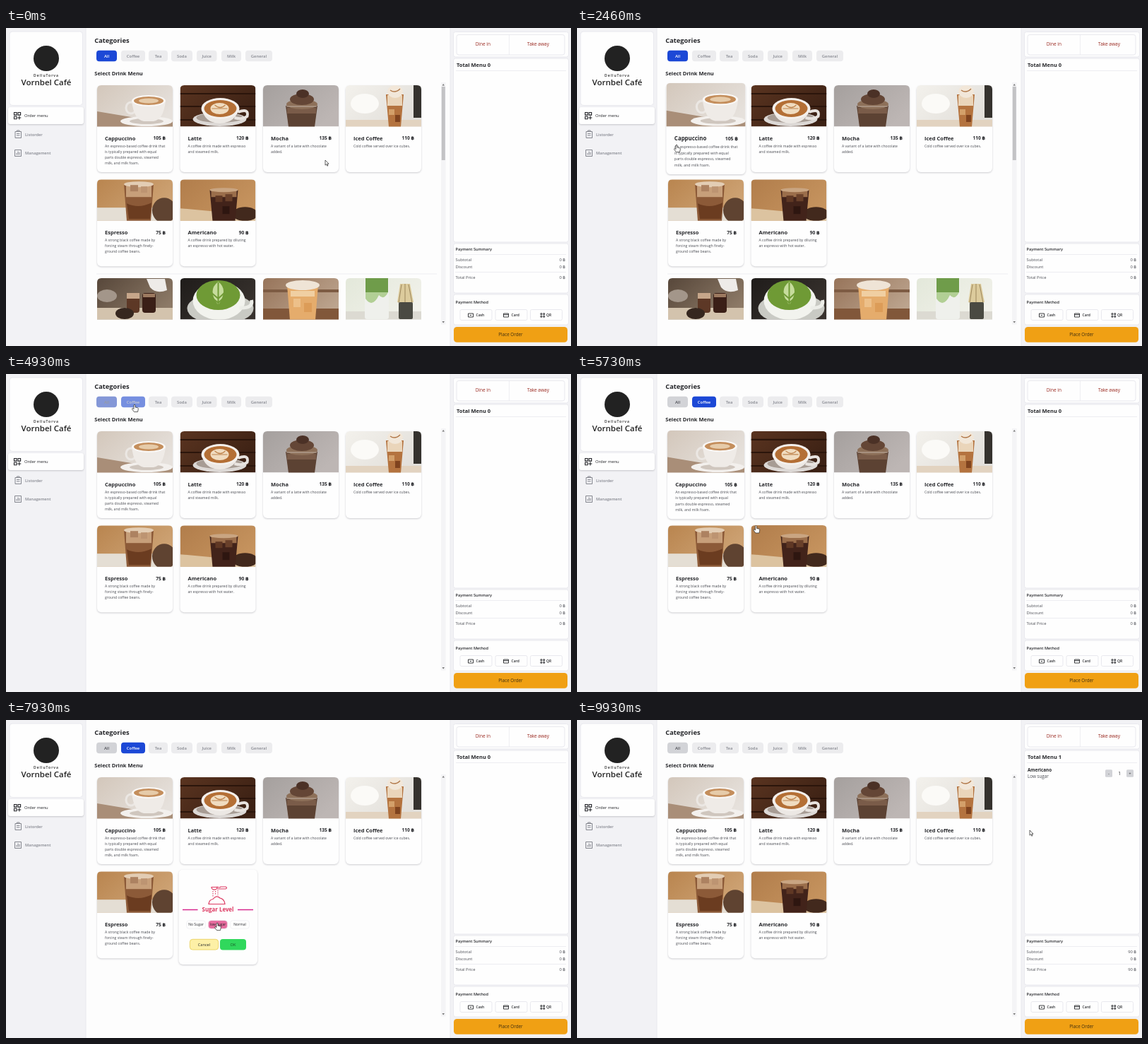
An HTML page that plays this animation: 800x450 px, repeating every 10 s.

```html
<!DOCTYPE html>
<html lang="en">
<head>
<meta charset="utf-8">
<title>Drink order screen</title>
<style>
html, body { margin: 0; height: 100%; overflow: hidden; background: #fdfdfd; }
svg { display: block; width: 800px; height: 450px; font-family: "Open Sans", "Noto Sans", "DejaVu Sans", sans-serif; }
.card > rect, .lift { filter: drop-shadow(0 1.3px 1.2px rgba(60, 60, 75, .25)); }
</style>
</head>
<body>
<svg id="stage" viewBox="0 0 800 450"></svg>
<script>
const stage = document.getElementById('stage');
const INK = '#25262a', SOFT = '#4c4e55', GREY = '#85878f', PALE = '#ececee', EDGE = '#e9e9ee';
const PAPER = '#fefefe', SIDE = '#f2f2f5', DARK = '#d2d3d7', BLUE = '#1c48d6', PINK = '#dd3a62', GREEN = '#30d85c';

// Markup helpers
const text = (x, y, s, size, fill = INK, weight = 400, anchor = 'start', extra = '') =>
  `<text x="${x}" y="${y}" font-size="${size}" fill="${fill}" font-weight="${weight}" text-anchor="${anchor}" ${extra}>${s}</text>`;
const rect = (x, y, w, h, fill, r = 0, extra = '') =>
  `<rect x="${x}" y="${y}" width="${w}" height="${h}" rx="${r}" fill="${fill}" ${extra}/>`;
const oval = (x, y, rx, ry, fill, extra = '') =>
  `<ellipse cx="${x}" cy="${y}" rx="${rx}" ry="${ry}" fill="${fill}" ${extra}/>`;
const shape = (d, fill) => `<path d="${d}" fill="${fill}"/>`;
const line = (d, color, w = .7, extra = '') => `<path d="${d}" fill="none" stroke="${color}" stroke-width="${w}" ${extra}/>`;
const box = (x, y, w, h, r = 3) => rect(x, y, w, h, PAPER, r, `stroke="${EDGE}"`);
const rule = (x1, x2, y) => line(`M${x1} ${y}H${x2}`, EDGE, .8);

let gradients = 0;
const backdrop = (from, to) => {
  const id = 'bg' + gradients++;
  return `<linearGradient id="${id}" x2="1" y2=".6"><stop stop-color="${from}"/><stop offset="1" stop-color="${to}"/></linearGradient>`
    + rect(0, 0, 107, 58.5, `url(#${id})`);
};
const glass = (l, r, y, fill) => shape(`M${l} ${y}H${r}L${r - 4} 59H${l + 4}Z`, fill);

const photos = {
  cappuccino: backdrop('#d3c7bb', '#e6e1dc') + shape('M0 37L48 45L107 51V59H0Z', '#a98e78')
    + oval(70, 51, 37, 7, '#f3f0ed') + oval(70, 51, 24, 4, '#cfc6be') + oval(48, 32, 7, 8, 'none', 'stroke="#ebe7e3" stroke-width="3"')
    + shape('M49 22H97Q94 49 80 51H66Q52 49 49 22Z', '#efebe7') + oval(73, 22, 24, 8, '#f9f7f5')
    + oval(73, 22, 21, 6, '#c48e5c') + oval(73, 22, 14, 3.5, '#e6cba9'),
  latte: backdrop('#5a3420', '#3c2114') + line('M0 12H107M0 30H107M0 49H107', '#2b150b', 2)
    + oval(56, 48, 38, 10, '#dcd8d5') + oval(56, 46, 33, 7, '#a79c94') + shape('M31 33Q34 53 56 54Q79 53 83 33Z', '#ece8e4')
    + line('M82 38Q98 32 95 44Q89 49 77 46', '#e8e3df', 4) + oval(57, 33, 27, 15, '#f4f0ec')
    + oval(57, 33, 23, 12, '#b46f35') + oval(56, 33, 13, 8, '#f0dcc0') + line('M45 33H67M49 28Q57 35 64 28', '#c08650', 1.2),
  mocha: backdrop('#a5a09e', '#bdb6b4') + glass(32, 77, 29, '#5c4233') + rect(34, 32, 41, 8, '#7a5c49')
    + oval(55, 27, 22, 7, '#8d7059') + oval(55, 20, 17, 8, '#644636') + oval(56, 12, 9, 6, '#4b3126') + line('M33 30H76', '#c0b0a4', 1),
  iced: backdrop('#f3f1ec', '#e2dfda') + rect(0, 49, 107, 10, '#e2d3c0') + oval(27, 26, 20, 14, '#fbfaf7')
    + rect(96, 0, 11, 46, '#35322e') + glass(57, 82, 13, '#b4733f') + rect(59, 14, 21, 15, '#ead5ba')
    + oval(70, 9, 11, 9, '#f2e7d9') + rect(61, 34, 8, 8, '#d3a06a') + rect(70, 42, 7, 10, '#7f431e') + line('M63 7Q70 12 77 5', '#b2794a', 1.5),
  espresso: backdrop('#b9854f', '#cfa577') + rect(0, 40, 107, 19, '#e4ded4') + oval(95, 44, 17, 18, '#5f4331')
    + glass(38, 80, 7, '#8c5a38') + rect(41, 9, 36, 16, '#c79f7a') + oval(59, 7, 21, 4, '#e3cdb4')
    + rect(47, 8, 11, 9, '#ad8261') + rect(62, 10, 9, 9, '#bd9472') + shape('M42 34Q59 42 77 33L75 56H45Z', '#6b3c20'),
  americano: backdrop('#b17d4b', '#c6945f') + shape('M0 41L45 45H107V59H0Z', '#dcc3a0') + oval(92, 49, 18, 10, '#42291d')
    + glass(42, 82, 15, '#42231a') + rect(44, 16, 36, 9, '#9b6e4b') + oval(62, 15, 20, 3, '#c9a582')
    + rect(50, 23, 10, 9, '#5f3724') + rect(64, 21, 10, 10, '#69402a') + rect(60, 38, 10, 11, '#2e1610'),
  boba: backdrop('#57473a', '#8d7a67') + rect(0, 42, 107, 17, '#d3c3ad') + oval(14, 25, 14, 9, '#a3968a')
    + rect(42, 21, 18, 28, '#5d3826', 4) + rect(64, 21, 19, 28, '#3a1f17', 4) + rect(42, 21, 18, 8, '#c6a68a')
    + rect(65, 22, 17, 5, '#9c7a60') + shape('M70 1H96L99 17Q84 23 75 13Z', '#eeebe8') + oval(39, 50, 13, 8, '#36271f'),
  matcha: backdrop('#1f1c1a', '#38322e') + oval(57, 43, 47, 22, '#c9cac4') + oval(55, 32, 37, 27, '#f2f3ee')
    + oval(54, 24, 31, 21, '#6f9a35') + shape('M54 5Q69 16 54 38Q38 17 54 5Z', '#c6dc9c')
    + line('M39 16L54 29L69 15M43 26L54 35L65 25M54 6V39', '#6f9a35', 2) + line('M84 42Q104 43 101 31', '#ecede8', 5),
  tea: backdrop('#97745a', '#bca48e') + rect(0, 43, 107, 16, '#81573a') + line('M0 18H107', '#7d5b43', 4)
    + glass(34, 78, 10, '#e5ac6c') + oval(56, 10, 24, 7, '#efe4d6') + rect(39, 18, 34, 8, '#f0cfa2')
    + rect(43, 29, 10, 12, '#edc08a') + rect(58, 35, 11, 13, '#dc9c58'),
  greenMilk: backdrop('#e3e8da', '#f1f1ea') + rect(0, 47, 107, 12, '#dcdad2') + rect(27, 0, 34, 58, '#eff0ec', 3)
    + rect(28, 0, 32, 20, '#6f9c4a') + shape('M28 20H60Q54 32 47 24Q38 43 28 29Z', '#b2cf95')
    + shape('M77 8H91L96 34H73Z', '#dccb9c') + line('M79 9L75 35M84 8V35M89 9L94 35', '#9c875c', 1) + rect(75, 34, 20, 24, '#4a4a42', 2)
};

const columns = [129, 246.5, 364, 481];
const cards = [
  [0, 81, 'Cappuccino', 105, ['An espresso-based coffee drink that', 'is typically prepared with equal', 'parts double espresso, steamed', 'milk, and milk foam.'], 'cappuccino'],
  [1, 81, 'Latte', 120, ['A coffee drink made with espresso', 'and steamed milk.'], 'latte'],
  [2, 81, 'Mocha', 135, ['A variant of a latte with chocolate', 'added.'], 'mocha'],
  [3, 81, 'Iced Coffee', 110, ['Cold coffee served over ice cubes.'], 'iced'],
  [0, 214.2, 'Espresso', 75, ['A strong black coffee made by', 'forcing steam through finely-', 'ground coffee beans.'], 'espresso'],
  [1, 214.2, 'Americano', 90, ['A coffee drink prepared by diluting', 'an espresso with hot water.'], 'americano']
].map(([col, y, name, price, lines, photo]) => ({ x: columns[col], y, w: 107, h: 123, name, price, lines, photo }));

const photo = name => `<g clip-path="url(#top)">${photos[name]}</g>`;
const cardMarkup = c => `<g class="card">${rect(0, 0, 107, 123, PAPER, 6)}${photo(c.photo)}`
  + text(11, 77.6, c.name, 7.5, INK, 700) + text(97, 77.4, c.price + ' ฿', 6.6, INK, 700, 'end')
  + c.lines.map((s, i) => text(11, 87.7 + i * 8.1, s, 5.1, SOFT)).join('') + '</g>';

const tabs = [['All', 128, 29], ['Coffee', 163, 34], ['Tea', 202, 27], ['Soda', 234, 30], ['Juice', 270, 28.5], ['Milk', 305, 28], ['General', 339, 38]];
const tabMarkup = ([name, x, w]) => `<g id="tab${name}">${rect(x, 31.7, w, 15.6, PALE, 4)}${text(x + w / 2, 41.9, name, 5.9, GREY, 600, 'middle')}</g>`;

const payButton = (x, name, icon) => box(x, 398.5, 45, 15, 2) + line(icon, INK, .9) + text(x + 22.5, 408.3, name, 5, INK, 600);
const option = (x, name, id = '') => `<g ${id}>${rect(x, 283.7, 27, 11.6, PAPER, 4, `stroke="${EDGE}" stroke-width=".6"`)}${text(x + 13.5, 291.2, name, 5, INK, 400, 'middle')}</g>`;
const totals = [['subtotal', 'Subtotal', 330], ['discount', 'Discount', 339.8], ['total', 'Total Price', 354.6]];

const sidebar = rect(0, 0, 113, 450, SIDE) + line('M113 0V450', EDGE, 1)
  + box(5, 5, 103.5, 104.5, 4) + oval(57, 43, 18, 18, '#222')
  + text(57, 69.3, 'DelluTorva', 5, '#222', 600, 'middle', 'letter-spacing="1"')
  + text(57, 81, 'Vornbel Café', 11.5, '#222', 600, 'middle')
  + rect(3, 112, 107, 24, PAPER, 3, 'class="lift"')
  + line('M11.5 119.5h3.6v3.6h-3.6zM17 119.5h3.6v3.6h-3.6zM11.5 125.2h3.6v3.6h-3.6zM18.8 124.5v5M16.3 127h5', INK, 1.1)
  + text(26, 126.3, 'Order menu', 5.9)
  + line('M13 146.5h8.5v9h-8.5zM15.5 146.5v-1.5h3.5v1.5M15 149.5h4.5M15 152h4.5', GREY, 1) + text(27, 152.7, 'Listorder', 5.7, GREY, 600)
  + line('M12.5 172.5h9v9h-9zM15 179.5v-2.5M17 179.5v-5M19 179.5v-3.7', GREY, 1) + text(27, 179.2, 'Management', 5.7, GREY, 600);

const orderPanel = rect(629, 0, 171, 450, SIDE) + line('M629 0V450', EDGE, 1)
  + box(633.5, 5.5, 163, 35.5) + box(638, 9.5, 153, 28.5) + line('M712.5 9.5V38', EDGE)
  + text(675.3, 25, 'Dine in', 6.5, '#98251c', 400, 'middle') + text(753.5, 25, 'Take away', 6.5, '#98251c', 400, 'middle')
  + box(633.5, 43, 163, 260) + rule(637, 793, 60.5) + text(638, 55, '', 7.5, INK, 700, 'start', 'id="count"')
  + box(633.5, 305, 163, 70) + text(636.5, 315, 'Payment Summary', 5.6, INK, 600) + rule(636, 793, 320.5) + rule(636, 793, 345.5)
  + totals.map(([id, s, y]) => text(636.5, y, s, 5.8, SOFT) + text(792, y, '', 5.8, SOFT, 400, 'end', `id="${id}"`)).join('')
  + box(633.5, 377, 163, 43) + text(636.5, 390, 'Payment Method', 5.6, INK, 600)
  + payButton(643, 'Cash', 'M654.5 404h7v5h-7zM657 406.5h2') + payButton(693, 'Card', 'M704.5 404h7v5h-7zM704.5 405.7h7')
  + payButton(742.5, 'QR', 'M757 403.8h1.8v1.8h-1.8zM760.8 403.8h1.8v1.8h-1.8zM757 407.4h1.8v1.8h-1.8zM760.8 407.4h1.8v1.8h-1.8z')
  + rect(634, 423, 161, 21.7, '#f0a014', 4.5) + text(714.5, 436.3, 'Place Order', 6.3, '#3c2c10', 400, 'middle')
  + `<g id="order">${text(638, 73, 'Americano', 6.3, INK, 700)}${text(638, 82.2, 'Low sugar', 6.3, SOFT)}`
  + rect(748, 70.3, 10, 10.5, DARK, 1.5) + rect(778, 70.3, 10, 10.5, DARK, 1.5)
  + text(753, 77.5, '-', 6, INK, 400, 'middle') + text(768, 78, '1', 6.5, INK, 400, 'middle') + text(783, 77.5, '+', 6, INK, 400, 'middle') + '</g>';

const sugarPanel = `<g id="sugar">${rect(244.5, 211.5, 111.5, 134.5, PAPER, 6, 'class="lift"')}`
  + line('M287 260.5Q288 254 293 253.5Q298 247 303 252Q309 253 310 260.5ZM291 236.5a4 3.6 0 1 0 8 0zM298.5 236Q303 238 304 236H311Q314 237.5 311 239H299', PINK, 1.2)
  + line('M293 242v8M296.5 242v6M300 241v7', PINK, 1.1, 'stroke-dasharray="1.5 1.5"')
  + line('M250 268.5H271.5M328 268.5H350', '#d6288e', 1.3) + text(300, 271.3, 'Sugar Level', 7.9, PINK, 700, 'middle')
  + option(255.5, 'No Sugar') + option(286.5, 'low Sugar', 'id="low"') + option(317.5, 'Normal')
  + rect(260.3, 310.3, 40.4, 14.8, '#fdf0a6', 4, 'stroke="#e7cd52" stroke-width=".8"') + text(280.5, 319.8, 'Cancel', 5.6, INK, 400, 'middle')
  + rect(303, 310, 37, 15.4, GREEN, 4, 'id="ok"') + text(321.5, 319.8, 'OK', 5.6, '#1b5428', 400, 'middle') + '</g>';

stage.innerHTML = '<clipPath id="top"><path d="M0 58.5V6Q0 0 6 0H101Q107 0 107 6V58.5Z"/></clipPath>'
  + rect(0, 0, 800, 450, '#fdfdfd') + sidebar + orderPanel
  + text(125.3, 21, 'Categories', 9.3, INK, 700) + text(125.3, 67, 'Select Drink Menu', 7.5, INK, 700) + tabs.map(tabMarkup).join('')
  + rect(616, 77, 6.5, 342.5, '#f4f4f6') + shape('M617.5 81.5L619.2 79L621 81.5ZM617.5 415L619.2 417.5L621 415Z', '#777')
  + `<g id="more">${rule(128, 610, 348)}${['boba', 'matcha', 'tea', 'greenMilk'].map((p, i) => `<g transform="translate(${columns[i]} 354)">${photo(p)}</g>`).join('')}`
  + rect(616.8, 83, 5, 104, '#c3c3c5') + '</g>' + cards.map(cardMarkup).join('') + sugarPanel
  + '<g id="cursor" stroke="#222" stroke-width=".7" stroke-linejoin="round" fill="#fff">'
  + '<path id="arrow" d="M0 0V7.2L1.7 5.7L2.8 8.2L4 7.7L2.9 5.2H5Z"/>'
  + '<path id="hand" d="M-1 .9Q0 -.7 1 .9V4L4.4 4.8Q5.5 5.1 5.3 6.5L4.5 10.6H-.6L-3.6 6.5Q-3.4 5 -1.9 5.8L-1 6.6Z"/></g>';

const $ = id => document.getElementById(id);
const show = (id, on) => $(id).setAttribute('display', on ? 'inline' : 'none');
const cardNodes = [...document.querySelectorAll('.card')];

// Pointer stops: time, x, y
const stops = [[0, 452, 187], [300, 452, 187], [2150, 141, 165], [2620, 141, 165], [3200, 84, 120.5], [3850, 84, 120.5],
  [4600, 182, 43], [5150, 182, 43], [5950, 269.5, 253], [7050, 269.5, 253], [7500, 299, 287], [7950, 299, 287],
  [8500, 318.5, 312.5], [8980, 318.5, 312.5], [9750, 641, 156], [10000, 641, 156]];
const FILTER = 4840, FLIP = 6500, PICK = 7700, CONFIRM = 8960, FADE = 160;

const clamp = v => Math.min(1, Math.max(0, v));
const ease = k => k * k * (3 - 2 * k);
function pointer(t) {
  const i = Math.max(1, stops.findIndex(s => s[0] >= t));
  const [t0, x0, y0] = stops[i - 1], [t1, x1, y1] = stops[i];
  const k = ease(clamp((t - t0) / (t1 - t0)));
  return [x0 + (x1 - x0) * k, y0 + (y1 - y0) * k];
}
function over(t, { x, y, w, h }) {
  if (t < 300) return false;
  const [px, py] = pointer(t);
  return px >= x && px <= x + w && py >= y && py <= y + h;
}
// Share of the last 200 ms spent over an area, used as a linear hover transition
function hover(t, area) {
  let n = 0;
  for (let i = 0; i < 20; i++) n += over(t - i * 10, area);
  return n / 20;
}
const channels = hex => [1, 3, 5].map(i => parseInt(hex.slice(i, i + 2), 16));
function mix(a, b, k) {
  const to = channels(b);
  return `rgb(${channels(a).map((from, i) => Math.round(from + (to[i] - from) * k))})`;
}
function paintTab(name, fill, ink) {
  const [back, label] = $('tab' + name).children;
  back.setAttribute('fill', fill);
  label.setAttribute('fill', ink);
}

const okArea = { x: 303, y: 310, w: 37, h: 15.4 };
const hotAreas = [...cards, okArea, { x: 3, y: 112, w: 107, h: 75 }, ...tabs.map(([, x, w]) => ({ x, y: 31.7, w, h: 15.6 }))];

function draw(t) {
  const flipped = t >= FLIP && t < CONFIRM, ordered = t >= CONFIRM;
  cards.forEach((c, i) => {
    const s = 1 + .05 * hover(t, c);
    cardNodes[i].setAttribute('transform', `translate(${c.x + 53.5} ${c.y + 61.5}) scale(${s}) translate(-53.5 -61.5)`);
  });
  cardNodes[5].setAttribute('display', flipped ? 'none' : 'inline');
  show('sugar', flipped);
  show('more', t < FILTER);
  show('order', ordered);

  const filtered = clamp((t - FILTER) / FADE);
  const coffee = filtered * (1 - clamp((t - CONFIRM) / FADE));
  paintTab('All', mix(BLUE, DARK, filtered), mix('#ffffff', SOFT, filtered));
  paintTab('Coffee', mix(PALE, BLUE, coffee), mix(GREY, '#ffffff', coffee));
  $('low').firstChild.setAttribute('fill', mix(PAPER, '#e66a9d', clamp((t - PICK) / FADE)));
  $('ok').setAttribute('fill', mix(GREEN, '#43ee5c', hover(t, okArea)));

  $('count').textContent = 'Total Menu ' + (ordered ? 1 : 0);
  $('subtotal').textContent = $('total').textContent = (ordered ? 90 : 0) + ' ฿';
  $('discount').textContent = '0 ฿';

  const hot = hotAreas.some(area => over(t, area));
  $('cursor').setAttribute('transform', `translate(${pointer(t)})`);
  show('hand', hot);
  show('arrow', !hot);
}
function tick() {
  draw(performance.now() % 10000);
  requestAnimationFrame(tick);
}
tick();
</script>
</body>
</html>
```
